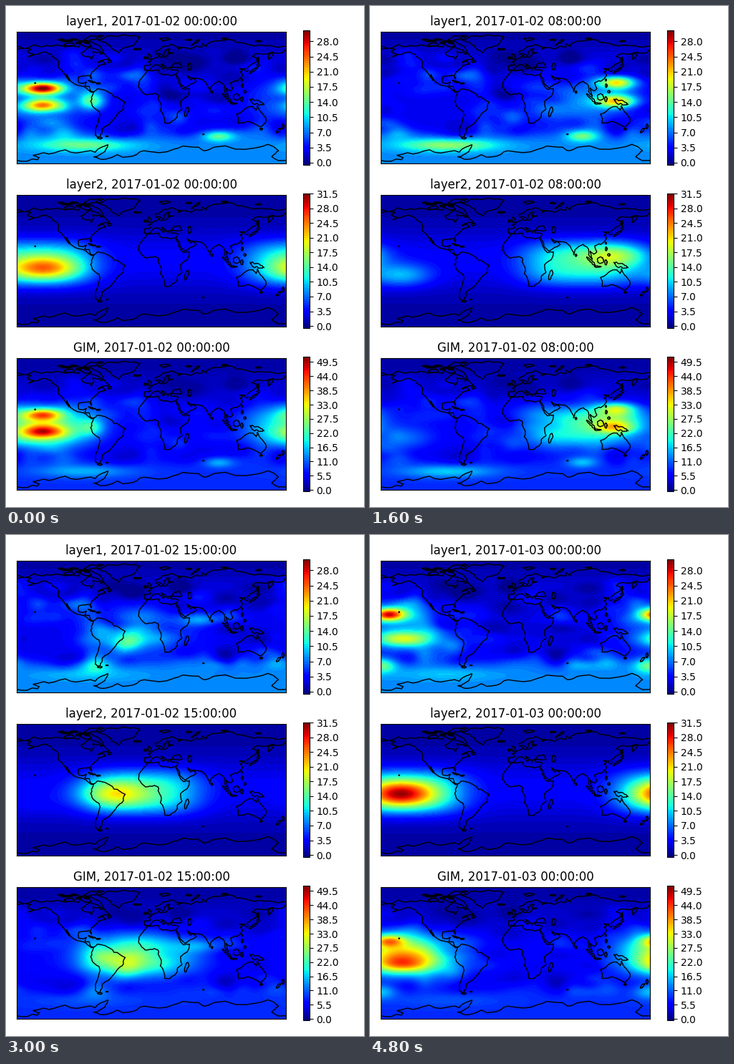
Animation, 500 px wide and 700 px high, one loop 5 s. Source, as a matplotlib script:

```python
import numpy as np
import matplotlib.pyplot as plt
from matplotlib.animation import FuncAnimation
from matplotlib.colors import BoundaryNorm

LAT_MAX = 88.4
lon = np.linspace(-180, 180, 376)
lat = np.linspace(LAT_MAX, -LAT_MAX, 185)
rng = np.random.default_rng(5)

# --- Coastlines: key points, roughened by midpoint displacement ---
coasts = []


def roughen(line, amount=.07, rounds=2):
    for _ in range(rounds):
        step = np.diff(line, axis=0)
        normal = np.column_stack([-step[:, 1], step[:, 0]])
        middle = line[:-1] + step / 2 + normal * rng.normal(0, amount, (len(step), 1))
        out = np.empty((2 * len(line) - 1, 2))
        out[::2], out[1::2] = line, middle
        line = out
    return line


def coast(*points, closed=False):
    line = np.array(points, float).reshape(-1, 2)
    if closed:
        line = np.vstack([line, line[:1]])
    coasts.append(roughen(line))


def isle(x, y, rx, ry, tilt=0):
    a = np.linspace(0, 2 * np.pi, 9)
    u, v, t = rx * np.cos(a), ry * np.sin(a), np.radians(tilt)
    line = np.column_stack([x + u * np.cos(t) - v * np.sin(t), y + u * np.sin(t) + v * np.cos(t)])
    coasts.append(roughen(line, .15))


# North America
coast(-168, 66, -157, 71, -136, 69, -125, 70, -115, 68, -97, 68, -95, 72, -88, 68, -81, 69, -87, 65, -94, 60,
      -92, 57, -82, 55, -80, 51, -77, 57, -78, 62, -70, 61, -67, 58, -64, 60, -56, 52, -66, 50, -71, 47,
      -65, 49, -61, 45, -66, 44, -70, 43, -76, 37, -81, 31, -80, 25, -84, 30, -97, 28, -97, 20, -91, 19,
      -87, 21, -89, 16, -83, 15, -81, 9, -77, 8, -80, 7, -87, 13, -95, 16, -105, 20, -113, 31, -110, 23,
      -117, 33, -124, 40, -124, 48, -134, 58, -148, 60, -164, 55, -158, 58, -166, 62, -161, 65, closed=True)
# South America
coast(-77, 8, -72, 12, -62, 10, -50, 1, -35, -6, -39, -17, -48, -26, -57, -36, -65, -41, -66, -47, -69, -53,
      -75, -50, -73, -38, -70, -18, -76, -14, -81, -5, -80, 1, -77, 8)
# Africa
coast(33, 31, 20, 31, 11, 33, 10, 37, -6, 36, -10, 30, -16, 22, -17, 14, -8, 4, 4, 6, 9, 4, 9, -1, 13, -9,
      12, -17, 18, -34, 25, -34, 32, -29, 35, -20, 41, -15, 39, -5, 51, 12, 43, 11, 37, 19, 33, 30)
# Europe and Siberia
coast(33, 31, 36, 36, 27, 37, 26, 40, 41, 41, 38, 47, 31, 46, 28, 42, 23, 40, 22, 37, 19, 42, 13, 45, 18, 40,
      16, 38, 9, 44, 3, 43, -2, 37, -9, 37, -9, 43, -1, 44, -4, 48, 8, 54, 10, 57, 11, 54, 20, 55, 23, 59,
      29, 60, 22, 61, 25, 65, 21, 65, 17, 61, 16, 56, 11, 59, 6, 58, 5, 62, 15, 68, 26, 71, 41, 67, 35, 65,
      44, 67, 60, 69, 68, 68, 68, 72, 73, 68, 75, 72, 104, 78, 113, 74, 130, 71, 160, 69.5, 180, 69)
# Southern and eastern Asia
coast(180, 65, 178, 62, 163, 60, 162, 56, 157, 51, 156, 57, 163, 61, 143, 59, 135, 55, 141, 53, 140, 48,
      128, 40, 129, 35, 126, 35, 125, 39, 118, 39, 122, 37, 119, 35, 122, 30, 114, 22, 106, 20, 109, 12,
      105, 9, 100, 13, 103, 2, 98, 9, 97, 17, 91, 22, 80, 15, 78, 8, 73, 20, 66, 25, 57, 26, 48, 30, 52, 24,
      56, 26, 60, 22, 45, 13, 35, 28, 33, 30)
coast(-180, 69, -170, 66, -180, 65)
# Australia, Greenland, Antarctica
coast(142, -11, 140, -17, 136, -12, 131, -12, 122, -18, 114, -22, 116, -34, 131, -32, 138, -35, 146, -39,
      151, -35, 153, -27, 146, -19, closed=True)
coast(-47, 82, -32, 83, -15, 81, -20, 75, -24, 70, -40, 65, -44, 60, -53, 66, -55, 70, -68, 76, -73, 78,
      closed=True)
coast(-180, -84, -152, -83, -150, -80, -158, -77, -130, -74, -100, -74, -75, -73, -66, -66, -58, -63,
      -62, -72, -77, -79, -60, -82, -30, -79, -10, -71, 30, -69, 55, -66, 70, -71, 85, -66, 140, -67,
      170, -71, 161, -79, 180, -84)
# Arctic islands
isle(-74, 68, 12, 3, -35)
isle(-110, 71, 7, 2)
isle(-77, 80, 13, 2.4, 12)
isle(18, 78.5, 7, 1.5)
isle(59, 73.7, 7, 1, 35)
isle(-19, 65, 5, 1.3)
for x in np.linspace(-121, -86, 10):
    isle(x, rng.uniform(73, 78), 3.5, 1)
for x in (50, 98, 143):
    isle(x, rng.uniform(75, 80), 4, .8)
# British Isles, Caspian Sea, Madagascar, Sri Lanka
isle(-2.5, 54.5, 2.2, 4, 15)
isle(-8, 53.3, 2, 1.6)
isle(51, 41.5, 2.3, 5)
isle(47, -19, 2, 7, -15)
isle(81, 7.5, 1, 1.7)
# Japan, Sakhalin, Indonesia, Philippines, New Guinea
isle(136.5, 36.5, 7, 1.4, 35)
isle(143, 43.5, 2, 1.3)
isle(143, 50, .8, 4.3)
isle(101, -.5, 8, 1.5, -45)
isle(110, -7.5, 4.5, .7, -5)
isle(114, 1, 4, 4.5)
isle(121, -2, 1.6, 3.5)
isle(121.5, 16, 1.2, 2.6)
isle(125, 8, 1.6, 1.6)
isle(121, 23.7, .7, 1.4)
isle(141, -5.5, 10, 2.3, -20)
# New Zealand, Tasmania, Caribbean, Newfoundland, far south
isle(176, -38.5, 1.6, 3.2)
isle(170, -44, 4, 1.3, 45)
isle(146.7, -42, 1.7, 1.2)
isle(-79.5, 21.7, 5, .6, -15)
isle(-71, 19, 2.6, .8)
isle(-56, 48.7, 2.8, 1.6)
isle(-69, -54, 3.2, 1)
isle(-59.5, -51.7, 1.5, .4)
isle(69.5, -49, .9, .4)
isle(-155.5, 19.6, .6, .5)


# --- Fields ---
def bump(x, y, height, sx, sy, power=2):
    dx = (lon - x + 180) % 360 - 180
    across = np.exp(-np.abs(dx / sx) ** power * .5)
    along = np.exp(-np.abs((lat - y) / sy) ** power * .5)
    return height * np.outer(along, across)


def ease(hour, hours, heights):
    return np.interp(hour, hours, heights)


ripples = [(rng.uniform(-180, 180), rng.uniform(-50, 60), rng.choice([-1.8, 1.8]),
            rng.uniform(9, 18), rng.uniform(5, 9)) for _ in range(60)]


# Daytime bulge and the two cores that follow the sun
def noon(hour):
    return 205 - 14.6 * hour


def morning_core(hour):
    return 215 - 10 * hour


def evening_core(hour):
    return -50 - 11.5 * (hour - 15)


def lower_layer(hour):
    total = (.8 + 1.7 / (1 + np.exp((lat - 65) / 6)) + 5.2 / (1 + np.exp((lat + 50) / 5)))[:, None]
    total = total + bump(noon(hour), -6, 5.5, 48, 24)
    for x, y, height, sx, sy in ripples:
        total += bump(x - 5 * hour, y, height, sx, sy)

    # Crests on both sides of the magnetic equator
    x = morning_core(hour)
    total += bump(x, min(12 + hour, 22), ease(hour, [0, 4, 8, 10, 14], [24, 14, 14, 5, 0]), 18, 5.5)
    total += bump(x, max(-21 + 2 * hour, -11), ease(hour, [0, 8, 10, 15, 18], [17, 17, 15, 5, 0]), 18, 6)
    x = evening_core(hour)
    total += bump(x - 15, 6 + 2 * (hour - 19), ease(hour, [14, 19, 24], [0, 9, 21]), 16, 6)
    total += bump(x, -17, ease(hour, [14, 19, 24], [0, 7, 11]), 24, 7)
    total += bump(x - 25, -52, ease(hour, [12, 15, 24], [0, 5, 9]), 15, 7)

    # Spots over South America and the southern belt
    total += bump(-27 - 3 * (hour - 15), -19, ease(hour, [10, 15, 19, 23], [0, 5, 11, 0]), 13, 9)
    total += bump(-80, -5, ease(hour, [0, 4], [10, 0]), 12, 8)
    total += bump(-90, -64, ease(hour, [0, 10, 15], [7, 9, 2]), 45, 6)
    total += bump(90, -52, ease(hour, [0, 10, 15], [8, 7, 2]), 14, 5)
    return np.clip(total, 0, None)


def upper_layer(hour):
    total = (.6 + 2.7 * np.exp(-(lat / 42) ** 2))[:, None]
    total = total + bump(noon(hour), -4, 9.5, 62, 24, 3)
    total += bump(morning_core(hour), min(-10 + 2 * hour, 7),
                  ease(hour, [0, 4, 8, 10, 14], [13, 10, 8, 6, 0]), 32, 11)
    total += bump(evening_core(hour), -6, ease(hour, [10, 15, 19, 24], [0, 9, 13, 18]), 32, 12)
    total += bump(-152, -20, 7 * np.exp(-((hour - 9) / 4) ** 2), 28, 11)
    return total


# --- Figure ---
fig, axes = plt.subplots(3, 1, figsize=(5, 7), dpi=100, facecolor="white")


def make_panel(ax, name, peak, tick_step):
    levels = np.arange(-.5, peak + .25, .5)
    image = ax.imshow(np.zeros((lat.size, lon.size)), cmap="jet", norm=BoundaryNorm(levels, 256),
                      extent=(-180, 180, -LAT_MAX, LAT_MAX), interpolation="nearest")
    for line in coasts:
        ax.plot(*line.T, color="black", lw=1)
    ax.set(xlim=(-180, 180), ylim=(-LAT_MAX, LAT_MAX), xticks=[], yticks=[])
    bar = fig.colorbar(image, ax=ax, ticks=np.arange(0, peak + .1, tick_step), format="%.1f")
    bar.minorticks_off()
    title = ax.set_title(f"{name}, 2017-01-02 00:00:00", fontsize=12)
    return name, image, title, peak


panels = [make_panel(axes[0], "layer1", 30.5, 3.5),
          make_panel(axes[1], "layer2", 31.5, 3.5),
          make_panel(axes[2], "GIM", 51.5, 5.5)]
fig.tight_layout()


def update(hour):
    lower, upper = lower_layer(hour), upper_layer(hour)
    stamp = f"2017-01-{2 + hour // 24:02d} {hour % 24:02d}:00:00"
    artists = []
    for (name, image, title, peak), data in zip(panels, (lower, upper, lower + upper)):
        image.set_data(np.minimum(data, peak - .01))
        title.set_text(f"{name}, {stamp}")
        artists += [image, title]
    return artists


anim = FuncAnimation(fig, update, frames=25, interval=200, repeat=True, repeat_delay=0)
plt.show()
```
